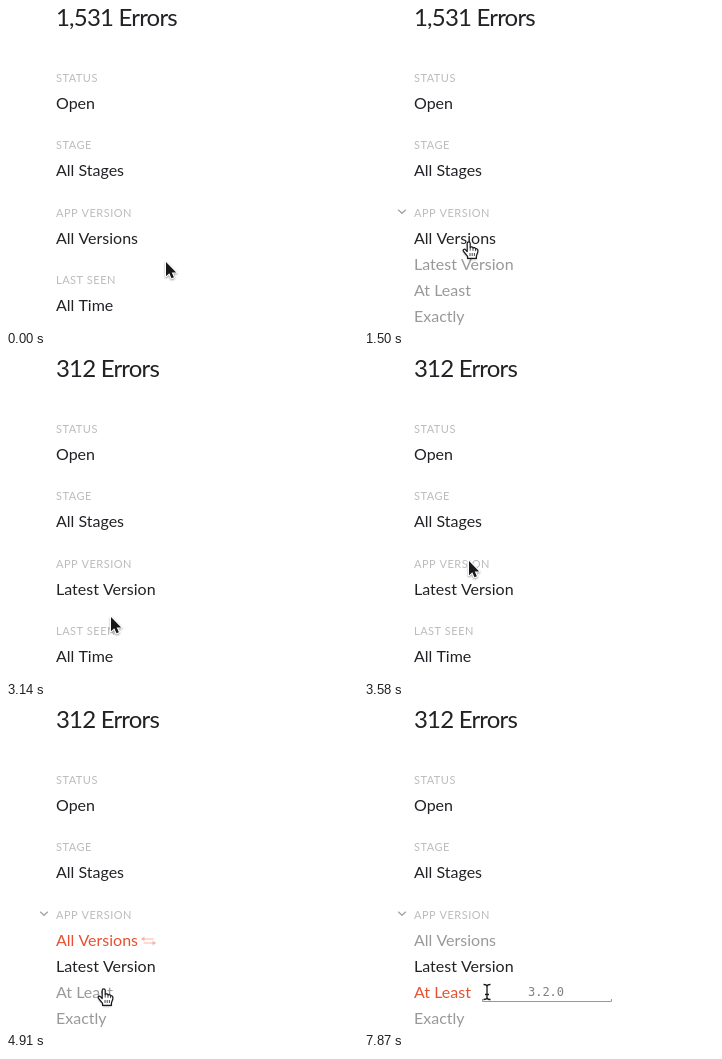
Recreate the animation shown at these times as an HTML page with a canvas. Size 352x323 px, loop 8 s.

```html
<!DOCTYPE html>
<html lang="en">
<head>
<meta charset="utf-8">
<title>Error filters</title>
<style>
  html, body { margin: 0; width: 100%; height: 100%; overflow: hidden; background: #fff; }
  canvas { display: block; width: 352px; height: 323px; }
</style>
</head>
<body>
<canvas id="stage"></canvas>
<script>
const W = 352, H = 323, LOOP = 8000;
const INK = '#222226', GREY = '#999', PALE = '#bcbcbc', RED = '#e8502f';
const SANS = 'Lato, "Open Sans", sans-serif';
const MONO = '"DejaVu Sans Mono", monospace';
const ROWS = [238, 264, 290, 316];
const OPTIONS = ['All Versions', 'Latest Version', 'At Least', 'Exactly'];

const canvas = document.getElementById('stage');
const ctx = canvas.getContext('2d');
const dpr = window.devicePixelRatio || 1;
canvas.width = W * dpr;
canvas.height = H * dpr;

// The screen refreshes in bursts: first time, last time, count
const bursts = [
  [0, 0, 1], [150, 1050, 7], [1500, 1500, 1], [2100, 2690, 5], [3140, 4170, 8],
  [4470, 5360, 7], [5650, 6240, 5], [6540, 6540, 1], [6830, 7270, 4], [7870, 7870, 1]
];
const ticks = bursts.flatMap(([a, b, n]) =>
  Array.from({ length: n }, (_, i) =>
    Math.floor((a + (n > 1 ? (b - a) * i / (n - 1) : 0)) / 10) * 10));
const snap = t => ticks.filter(k => k <= t).pop();

// Pointer path: time, x, y
const path = [
  [0, 160, 256], [150, 157, 254], [300, 149, 249], [450, 138, 243], [600, 125, 237],
  [750, 113, 233], [1050, 105, 230], [2100, 106, 243], [2240, 107, 285],
  [2390, 105, 271], [2690, 105, 260], [3140, 105, 260], [3580, 105, 204],
  [4170, 105, 207], [4470, 105, 207], [4760, 102, 229], [4910, 98, 281],
  [5060, 90, 291], [5360, 81, 289], [5650, 81, 289], [5940, 124, 285],
  [6240, 123, 283.5], [LOOP, 123, 283.5]
];

function pointerAt(t) {
  const i = path.findIndex(p => p[0] > t);
  const [ta, xa, ya] = path[i - 1], [tb, xb, yb] = path[i];
  const k = (t - ta) / (tb - ta);
  return [Math.round(xa + (xb - xa) * k), Math.round(ya + (yb - ya) * k)];
}

function text(str, x, y, color, size = 16, spacing = 0, family = SANS) {
  ctx.font = `${size}px ${family}`;
  ctx.letterSpacing = spacing + 'px';
  ctx.fillStyle = color;
  ctx.fillText(str, x, y);
}

const label = (str, y) => text(str, 50, y, PALE, 11, 0.5);

function line(points, color, width = 1) {
  ctx.beginPath();
  points.forEach(([x, y]) => ctx.lineTo(x, y));
  ctx.strokeStyle = color;
  ctx.lineWidth = width;
  ctx.stroke();
}

function swapIcon(x, y, alpha) {
  ctx.save();
  ctx.globalAlpha = alpha;
  ctx.translate(x, y);
  for (const side of [1, -1]) {
    ctx.save();
    ctx.translate(8, 0);
    ctx.scale(side, side);
    line([[-6, -2], [5, -2]], RED, 1.4);
    ctx.beginPath();
    ctx.moveTo(-8, -2);
    ctx.lineTo(-4, -4.8);
    ctx.lineTo(-4, 0.6);
    ctx.fillStyle = RED;
    ctx.fill();
    ctx.restore();
  }
  ctx.restore();
}

const arrowShape = new Path2D('M0 0V14.3L3.3 11.3L5.5 16.3L7.9 15.3L5.7 10.4H10.2Z');
const handShape = new Path2D(
  'M-1.8 1.3C-1.8-.5 1.2-.5 1.2 1.3V5.6C1.7 4.5 3.9 4.7 4 6.1C4.7 5.2 6.5 5.6 6.6 6.9' +
  'C7.5 6.4 8.9 7 8.9 8.4C8.9 11.5 7.7 12 7.4 14V16.4H-1.4V14.4' +
  'C-2.6 12.6-4.2 11.3-5.6 9.2C-6.6 7.6-4.6 6.5-3.4 7.8L-1.8 9.5Z');
const handCreases = new Path2D('M1.2 5.6V8.6M4 6.3V8.8M6.6 7V9.2M1 11V14M3.2 11V14M5.4 11V14');
const beamShape = new Path2D('M-3.5-7.5C-1.5-7.5 0-7 0-5.5V5.5C0 7-1.5 7.5-3.5 7.5' +
  'M3.5-7.5C1.5-7.5 0-7 0-5.5M3.5 7.5C1.5 7.5 0 7 0 5.5M-2 2.5H2');

function shadow() {
  ctx.shadowColor = 'rgba(0,0,0,.4)';
  ctx.shadowBlur = 2 * dpr;
  ctx.shadowOffsetY = dpr;
}

const pointers = {
  arrow() {
    shadow();
    ctx.strokeStyle = '#fff';
    ctx.lineWidth = 2;
    ctx.stroke(arrowShape);
    ctx.shadowColor = 'transparent';
    ctx.fillStyle = '#18181c';
    ctx.fill(arrowShape);
  },
  hand() {
    shadow();
    ctx.fillStyle = '#fff';
    ctx.fill(handShape);
    ctx.shadowColor = 'transparent';
    ctx.strokeStyle = '#18181c';
    ctx.lineWidth = 1.2;
    ctx.stroke(handShape);
    ctx.lineWidth = 0.8;
    ctx.stroke(handCreases);
  },
  beam() {
    ctx.strokeStyle = '#fff';
    ctx.lineWidth = 3;
    ctx.stroke(beamShape);
    ctx.strokeStyle = '#18181c';
    ctx.lineWidth = 1.3;
    ctx.stroke(beamShape);
  }
};

function pointer(t) {
  const kind = t >= 5940 ? 'beam'
    : t < 750 || (t >= 3140 && t < 3720) ? 'arrow' : 'hand';
  ctx.save();
  ctx.translate(...pointerAt(t));
  ctx.lineJoin = 'round';
  pointers[kind]();
  ctx.restore();
}

// Hovered option and how far its swap icon has slid in
function hoverAt(t) {
  if (t >= 5060) return [2, 0];
  if (t >= 4910) return [0, 0.3];
  if (t >= 4760) return [0, 0.2];
  if (t >= 2690) return [1, 1];
  if (t >= 2540) return [1, 0.5];
  if (t >= 2240) return [2, 0];
  return [-1, 0];
}

function menu(t) {
  const chosen = t < 3140 ? 0 : 1;
  const [hover, slide] = hoverAt(t);
  OPTIONS.forEach((name, i) => {
    const active = i === hover;
    const dots = active && i === 2 && t < 5650 ? ' ...' : '';
    text(name + dots, 50, ROWS[i], active ? RED : i === chosen ? INK : GREY);
    if (active && slide) {
      const end = i ? 146 : 132;
      swapIcon(end + 1 + 5 * slide, ROWS[i] - 5, slide);
    }
  });
}

function field(t) {
  line([[118.5, 291], [118.5, 293.5], [247.5, 293.5], [247.5, 291]], GREY);
  const count = t < 6540 ? 0 : t < 6830 ? 1 : 1 + ticks.filter(k => k >= 6830 && k <= Math.min(t, 7270)).length;
  const typed = '3.2.0'.slice(0, count);
  ctx.font = `12px ${MONO}`;
  ctx.letterSpacing = '0px';
  const w = ctx.measureText(typed).width;
  text(typed, 182 - w / 2, 288, '#808080', 12, 0, MONO);
  if (t < 7870) {
    ctx.fillStyle = '#777';
    ctx.fillRect(count ? Math.round(182 + w / 2) - 1 : 182, 275, 1, t < 6090 ? 19 : 16);
  }
}

function draw(t) {
  ctx.setTransform(dpr, 0, 0, dpr, 0, 0);
  ctx.fillStyle = '#fff';
  ctx.fillRect(0, 0, W, H);

  const filtered = t >= 3140;
  const open = (t >= 1500 && t < 3140) || t >= 4470;
  text(filtered ? '312 Errors' : '1,531 Errors', 50, 20, INK, 24, -0.8);
  label('STATUS', 76);
  text('Open', 50, 103, INK);
  label('STAGE', 143);
  text('All Stages', 50, 170, INK);
  label('APP VERSION', 211);

  if ((t >= 450 && t < 3140) || t >= 3720)
    line([[34.2, 203.7], [38, 207.3], [41.8, 203.7]], '#a4a4a4', 1.3);

  if (open) {
    menu(t);
  } else {
    text(OPTIONS[filtered ? 1 : 0], 50, ROWS[0], INK);
  }
  // The last group stays in place until the list opens over it
  if (!open) {
    label('LAST SEEN', 278);
    text('All Time', 50, 305, INK);
  }
  if (t >= 5650) field(t);
  pointer(t);
}

const start = performance.now();
function tick() {
  draw(snap((performance.now() - start) % LOOP));
  requestAnimationFrame(tick);
}
tick();
</script>
</body>
</html>
```
